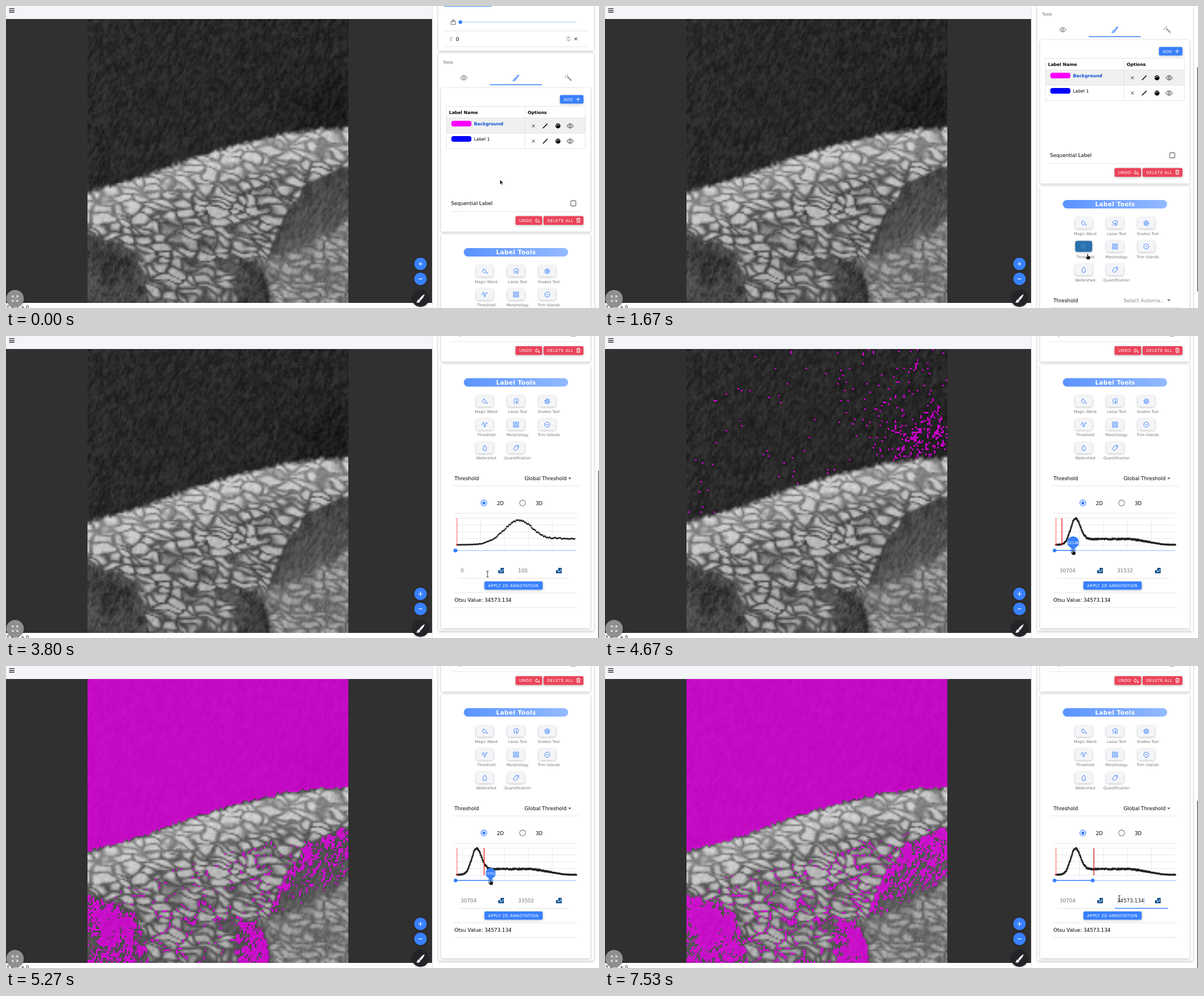
An HTML page with a canvas for the animation above (8 s loop, 1048x534 px).

```html
<!DOCTYPE html>
<html lang="en">
<head>
<meta charset="utf-8">
<title>Threshold annotation</title>
<style>
html, body { margin: 0; width: 100%; height: 100%; overflow: hidden; background: #fff; }
#viewer { position: absolute; left: 0; top: 23px; width: 753px; height: 502px; background: #303030; }
canvas { position: absolute; left: 144px; top: 0; width: 460.5px; height: 502px; }
#mask { image-rendering: pixelated; }
svg { position: absolute; left: 0; top: 0; font: 8.8px "DejaVu Sans", Verdana, sans-serif; }
.card { filter: drop-shadow(0 1px 2px #0004); }
.cell { font-size: 7.7px; }
.bold { font-weight: bold; }
.tool { font-size: 6.6px; fill: #737373; text-anchor: middle; }
.btn { font-size: 7px; letter-spacing: .45px; fill: #fff; }
.title { font-size: 10.5px; font-weight: bold; letter-spacing: .45px; fill: #fff; text-anchor: middle; }
</style>
</head>
<body>
<div id="viewer">
  <canvas id="scan" width="154" height="168"></canvas>
  <canvas id="mask" width="154" height="168"></canvas>
</div>
<svg id="ui" width="1048" height="534"></svg>
<script>
const FPS = 15, FRAMES = 120, W = 154, H = 168;
const BLUE = '#3880ff', RED = '#eb445a', INK = '#222', RULE = '#ddd';
const $ = id => document.getElementById(id);
const mix = (a, b, k) => a + (b - a) * k;
const clamp = x => Math.min(1, Math.max(0, x));
const bell = (x, mid, width) => Math.exp(-(((x - mid) / width) ** 2) / 2);
const repeat = (count, draw) => Array.from({ length: count }, (_, i) => draw(i)).join('');
function smooth(a, b, x) {
  const k = clamp((x - a) / (b - a));
  return k * k * (3 - 2 * k);
}

// ---- Scan texture ----
function hash(x, y) {
  let n = Math.imul(x, 374761393) + Math.imul(y, 668265263) | 0;
  n = Math.imul(n ^ n >>> 13, 1274126177);
  n = Math.imul(n ^ n >>> 15, 2246822519);
  return ((n ^ n >>> 16) >>> 0) / 2 ** 32;
}
function noise(x, y) {
  const i = Math.floor(x), j = Math.floor(y), u = smooth(0, 1, x - i), v = smooth(0, 1, y - j);
  return mix(mix(hash(i, j), hash(i + 1, j), u), mix(hash(i, j + 1), hash(i + 1, j + 1), u), v);
}
// Gap between the nearest and second nearest cell centre.
function cellGap(x, y) {
  const i = Math.floor(x), j = Math.floor(y);
  let near = 9, next = 9;
  for (let a = i - 1; a <= i + 1; a++) for (let b = j - 1; b <= j + 1; b++) {
    const d = Math.hypot(a + hash(a, b) - x, b + hash(a + 99, b) - y);
    if (d < near) { next = near; near = d; } else if (d < next) next = d;
  }
  return next - near;
}

// Edges of the regions, as heights over x.
const surface = x => 330 - 114 * Math.sin(Math.PI / 2 * ((x - 144) / 460) ** 1.15);
const bandTop = x => 290 + 122 * ((604.5 - x) / 130) ** 2.5;
const bandEnd = x => 375 + 80 * ((604.5 - x) / 164) ** .6;
const leftEdge = x => 398 + .4 * (x - 144) + 90 * ((x - 144) / 110) ** 8;

function gray(x, y) {
  const grain = noise((x + .4 * y) / 3.5, (y - .4 * x) / 9) + .5 * hash(x | 0, y | 0) - .75;
  const air = 42 - 4 * (x - 144) / 460 - 12 * bell(x, 572, 45) * bell(y, 175, 34) + 27 * grain;
  const depth = y - surface(x) + 7 * (noise(x / 5, y / 5) - .5);

  const wx = x + 26 * noise(x / 26, y / 18), wy = y + 15 * noise(x / 22 + 40, y / 16);
  const patch = noise(x / 30 + 9, y / 24);
  const cell = smooth(-.05, .3 + .5 * patch, cellGap((wx + .35 * wy) / 33, (wy - .3 * wx) / 14));
  const vein = 126 - 58 * smooth(15, 95, depth) + 30 * (patch - .5);
  let v = mix(vein, 208 - 34 * clamp(depth / 150), cell) + 26 * grain;

  const wobble = y + 14 * (noise(x / 16, y / 14) - .5);
  const below = smooth(-8, 8, wobble - bandEnd(x));
  const across = clamp((y - bandTop(x)) / (bandEnd(x) - bandTop(x)));
  const hollow = 64 + 40 * grain + 24 * (patch - .5);
  v = mix(v, 100 + 62 * cell + 34 * grain, below * smooth(444, 462, x));
  v = mix(v, 66 + 24 * across + 36 * grain, smooth(-7, 5, wobble - bandTop(x)) * (1 - below));
  v = mix(v, hollow, smooth(-8, 8, wobble - leftEdge(x)));
  const half = 13 + 17 * smooth(440, 490, y), off = Math.abs(x - 427 - .13 * (y - 440));
  v = mix(v, hollow, smooth(5, -5, off - half) * smooth(438, 458, wobble));
  return mix(air, v, smooth(-6, 6, depth));
}

const values = Array.from({ length: W * H }, (_, i) => gray(144 + (i % W + .5) * 460.5 / W, 23 + (Math.floor(i / W) + .5) * 502 / H));
function paint(id, pixel) {
  const ctx = $(id).getContext('2d'), img = ctx.createImageData(W, H);
  values.forEach((v, i) => img.data.set(pixel(v), i * 4));
  ctx.putImageData(img, 0, 0);
}
paint('scan', v => [v, v, v, 255]);

// ---- Drawing helpers ----
const text = (x, y, s, attr = '') => `<text x="${x}" y="${y}" ${attr}>${s}</text>`;
const box = (x, y, w, h, r, fill, attr = '') =>
  `<rect x="${x}" y="${y}" width="${w}" height="${h}" rx="${r}" fill="${fill}" ${attr}/>`;
const line = (d, color = RULE, w = .8) => `<path d="${d}" fill="none" stroke="${color}" stroke-width="${w}"/>`;
const dot = (x, y, r, fill, attr = '') => `<circle cx="${x}" cy="${y}" r="${r}" fill="${fill}" ${attr}/>`;
const group = (move, content) => `<g transform="${move}">${content}</g>`;
const card = (y, end, x = 769, w = 264) => box(x, y, w, end - y, 2, '#fff', 'class="card"');
const button = (x, y, w, h, fill, label) =>
  box(x, y, w, h, 2, fill, 'class="card"') + text(x + 6.5, y + h / 2 + 2.5, label, 'class="btn"');

const ring = (x, y, r) => `M${x + r} ${y}a${r} ${r} 0 1 1 ${-2 * r} 0a${r} ${r} 0 1 1 ${2 * r} 0z`;
const polar = (r, i, n) => [r * Math.cos(i * 2 * Math.PI / n), r * Math.sin(i * 2 * Math.PI / n)];
const ICONS = {
  eye: 'M-6 0Q0-8 6 0Q0 8-6 0z' + ring(0, 0, 2),
  brush: 'M5-5Q1-3-1.5 1L0 2.5Q4-1 5-5zM-2 1.5Q-4 1.5-4 4L-5 5Q-1 6-.3 3z',
  wand: 'M-1-1L5 5L6 4L0-2zM-4-4l1.5 1.5M-.5-5.5v2M-5.5-.5h2',
  pencil: 'M-4 4L4-4',
  cross: 'M-2.5-2.5l5 5M2.5-2.5l-5 5',
  plus: 'M-3.5 0h7M0-3.5v7',
  minus: 'M-3.5 0h7',
  undo: 'M-1-3.5L-4 0L-1 3V1Q3 1 4 4Q4-2-1-2z',
  trash: 'M-3.5-2.5h7M-1.5-2.5v-1.5h3v1.5M-2.8-2.5l.5 6.5h4.6l.5-6.5M-1-.5v3M1-.5v3',
  stack: 'M-4-1h8v5h-8zM-3-2.5h6M-2-4h4',
  bucket: 'M-1-4l4 4-3.5 3.5-4-4zM-3-4.5l2 1.5' + ring(4, 3, .8),
  lasso: 'M-4 4.5L-2 2Q-6-2-2-4Q4-6 4.5-2L3.5 0M0-1L4 2L1 4.5z',
  snakes: ring(0, 0, 1.2) + repeat(6, i => ring(...polar(3.7, i + .3, 6), 1.1)),
  curve: 'M-5 1Q-3-5-2-4Q-1-4-1 3Q0 6 1 2Q2-4 3.5-4Q5-3 4-1.5',
  grid: repeat(4, i => `M${i % 2 * 5.5 - 4.5} ${(i >> 1) * 5.5 - 4.5}h3.5v3.5h-3.5z`),
  trim: ring(0, 0, 4.5) + 'M-2 0h4',
  drop: 'M0-5Q4 0 3 2A3 3 0 0 1-3 2Q-4 0 0-5z',
  tag: 'M0-4.5h4.5v4.5L-1.5 5L-5 1.5z' + ring(2.3, -2.3, .5),
  expand: repeat(4, i => {
    const a = i % 2 ? 1 : -1, b = i > 1 ? 1 : -1;
    return `M${5 * a} ${2 * b}v${3 * b}h${-3 * a}M${5 * a} ${5 * b}l${-3.5 * a} ${-3.5 * b}`;
  })
};
const icon = (x, y, name, color = INK, w = .9, fill = 'none') =>
  `<path transform="translate(${x} ${y})" d="${ICONS[name]}" fill="${fill}" stroke="${color}" stroke-width="${w}"/>`;
const palette = (x, y) => dot(x, y, 4.4, '#000') + repeat(4, i => {
  const [dx, dy] = polar(2.5, i + 4, 8);
  return dot(x + dx, y + dy, .8, '#fff');
});

// ---- Motion, in frames ----
const scrollAt = n => 85 * smooth(12, 18, n) + 42.5 * smooth(38, 41, n) + 226 * smooth(51, 55, n);
const drag = n => 1 - (1 - clamp((n - 64) / 21)) ** 2;
const knobAt = n => 794 + 68 * drag(n);
const valueAt = n => Math.round(30600.57 + 3159.33 * drag(n));
// The upper field trails the knob and catches up near the end of the drag.
const upperAt = n => Math.max(30704, valueAt(n - Math.max(0, 79 - n) * .29275));
const markAt = n => 796 + 68 * smooth(64, 87, n);

// Arrival frame and place of each pointer move.
const STOPS = [[5, 863, 314], [23, 853, 438], [41, 955, 476], [44, 909, 422], [56, 851, 421], [63, 794, 377],
  [90, 862, 377], [95, 894, 466], [108, 909, 411]];
function pointerAt(n) {
  if (n >= 64 && n < 90) return [knobAt(n), 377];
  return STOPS.reduce(([px, py], [end, x, y]) => {
    const k = smooth(end - 4, end, n);
    return [mix(px, x, k), mix(py, y, k)];
  }, [873, 307]);
}

// ---- Histogram ----
const coarse = x => 43 * bell(x, 907, 27) + 10 * smooth(930, 980, x);
const fine = x => 42 * bell(x, 831, 8.5) + 10 * smooth(815, 850, x) * (1 - smooth(920, 1000, x));
function histogram(height, step, size) {
  const count = Math.floor(212 / step);
  const d = repeat(count, i => {
    const x = 797 + i * step, h = height(x), jitter = (hash(i, 7) - .5) * Math.min(2.4, .6 + h / 5);
    return `${i ? 'L' : 'M'}${x} ${369 - h + jitter}`;
  });
  return line(d, INK, 1) + `<path d="${d.replace(/[LM]([^LM]+)/g, 'M$1h0')}" stroke="${INK}" stroke-width="${size}" stroke-linecap="round"/>`;
}
const coarsePlot = histogram(coarse, 2.1, 3), finePlot = histogram(fine, .85, 3.4);

// ---- Panel sections ----
const labelRow = (y, color, name, attr) =>
  box(787, y - 9, 35.5, 10, 4, color) + text(827, y - .8, name, `class="cell" ${attr}`) +
  icon(932, y, 'cross') + icon(953, y, 'pencil', '#000', 1.6) + palette(975.5, y) + icon(997, y, 'eye');

const sliceSection =
  card(-20, 79, 764, 275) + box(774, -1, 84, 2, 0, BLUE) + icon(790.5, 28.5, 'stack', '#666') +
  line('M803 28.5H1008', '#8fb6ff') + dot(803, 28.5, 3.2, BLUE) + line('M774 44H1028M774 72H1028') +
  text(784, 61, 'Z', 'class="cell" fill="#888"') + text(795, 61.5, '0') +
  box(989.5, 53, 9, 10, 2, '#eee') + line('M992 57l2-2 2 2M992 59.5l2 2 2-2', '#666') + icon(1007, 58, 'cross', INK, 1);

const labelSection =
  text(772.5, 101.5, 'Tools', 'font-size="7.15" fill="#666"') +
  icon(809, 127, 'eye', '#555') + icon(901, 127, 'brush', BLUE, 1.1) + icon(993, 127, 'wand', '#444') +
  box(855, 138.5, 92, 1.5, 0, BLUE) + card(145, 399) +
  button(979, 157.5, 41.5, 15, BLUE, 'ADD') + icon(1011, 165, 'plus', '#fff') +
  box(778.5, 198, 245.5, 27, 0, '#f0f0f0') + line('M778.5 177.5H1024V252H778.5zM778.5 198H1024M778.5 225H1024M917 177.5V252') +
  text(783, 190.5, 'Label Name', 'class="cell bold"') + text(922, 190.5, 'Options', 'class="cell bold"') +
  labelRow(212, '#f0f', 'Background', 'font-weight="bold" fill="#0a4fdc"') + labelRow(239, '#00f', 'Label 1', '') +
  text(786.5, 352, 'Sequential Label') + box(998, 344.5, 9, 9, 1, '#fff', 'stroke="#444"') + line('M786 363.5H1016') +
  button(900.5, 371.5, 47, 15.5, RED, 'UNDO') + icon(938.5, 379.5, 'undo', '#fff') +
  button(950, 371.5, 70.5, 15.5, RED, 'DELETE ALL') + icon(1011.5, 379, 'trash', '#fff');

const TOOLS = { 'Magic Wand': 'bucket', 'Lasso Tool': 'lasso', 'Snakes Tool': 'snakes', Threshold: 'curve',
  Morphology: 'grid', 'Trim Islands': 'trim', Watershed: 'drop', Quantification: 'tag' };
const toolGrid = pressed =>
  box(809, 428, 184.5, 15, 7.5, 'url(#pill)') + text(901.5, 439.3, 'Label Tools', 'class="title"') +
  Object.entries(TOOLS).map(([name, glyph], i) => {
    const x = 846 + i % 3 * 55.3, y = 469 + Math.floor(i / 3) * 41.2, on = pressed && glyph === 'curve';
    return box(x - 15, y - 10, 30, 19.5, 4, on ? '#2a6fac' : '#f4f5f8', 'class="card"') +
      icon(x, y, glyph, on ? '#4d96dd' : BLUE, 1) + text(x + 2.7, y + 20.5, name, 'class="tool"');
  }).join('');

function methodRow(n) {
  const open = n >= 41 && n < 51, chosen = n >= 47;
  return (open ? box(787, 591.5, 228, 27, 0, '#efefef') : '') +
    line('M787.5 618.5H1014.5', open ? BLUE : RULE, open ? 1.3 : .8) + text(792.5, 608.5, 'Threshold') +
    text(916.5, 608.5, chosen ? 'Global Threshold' : 'Select Automa...', chosen ? '' : 'fill="#8a8a8a"') +
    '<path d="M993.5 604h5.6l-2.8 3z" fill="#555"/>';
}

const radio = (x, on) => dot(x, 295.3, 5.2, '#fff', `stroke="${on ? BLUE : '#777'}" stroke-width="1.1"`) + (on ? dot(x, 295.3, 2.8, BLUE) : '');
const enterKey = x => `<path d="M${x + 5} 410v9.5h-10v-5.5h4v-4z" fill="#0b4f8f"/>` +
  line(`M${x + 3} 412v4h-5M${x - .5} 414.5l-1.5 1.5 1.5 1.5`, '#fff', .9);
const chartGrid = line(repeat(5, i => `M794 ${322 + i * 12}H1008`) + repeat(4, i => `M${838.5 + i * 42.3} 322V374`), '#e2e2e2');
const pin = (x, n) => group(`translate(${x} 378) scale(${smooth(64, 67, n) * (1 - smooth(77, 86, n))})`,
  `<path d="M0 0L-8.5-7A10.5 10.5 0 1 1 8.5-7z" fill="${BLUE}"/>` +
  text(0, -10, valueAt(n), 'font-size="6.6" fill="#fff" text-anchor="middle"'));

function thresholdForm(n) {
  const active = n >= 65, knob = knobAt(n), focus = n >= 107, pasted = n >= 112, picked = n >= 98 && !focus;
  const upper = pasted ? '34573.134' : active ? upperAt(n) : '100';
  return radio(844.5, true) + text(867.5, 298.5, '2D') + radio(913, false) + text(936, 298.5, '3D') +
    line('M792 313.5H1010') + chartGrid + (active ? finePlot : coarsePlot) +
    line('M797 322V370', '#f55', 1) + dot(797, 369, 1.4, '#c33') +
    (active ? line(`M${markAt(n)} 322V370`, n >= 87 ? '#c81e1e' : '#f22', 1.4) : '') +
    line('M794 379.3H1008', '#6fa2ff') + line(`M794 379.3H${knob}`, BLUE, 1.6) + dot(794.5, 379.3, 3.3, BLUE) +
    (active && n < 86 ? dot(knob, 379.3, 5.5, BLUE + '55') : '') + dot(knob, 379.3, 3.3, BLUE) + pin(knob, n) +
    text(803.5, 418, active ? '30704' : '0', 'fill="#777"') + line('M799 428.5H893') + enterKey(875) +
    (focus && !pasted ? box(904.5, 409, 29, 11, 0, '#b4d5fe') : '') +
    text(905, 418, upper, `fill="${focus ? INK : '#777'}"`) + enterKey(977) +
    line('M901 428.5H995', focus ? BLUE : RULE, focus ? 1.3 : .8) + (pasted ? line('M953.3 410V419.5', '#79a8ee') : '') +
    button(845.5, 434, 103, 14.5, BLUE, 'APPLY 2D ANNOTATION') + line('M792 454H1010M792 480H1010') +
    (picked ? box(846, 461, 47.5, 11.5, 0, '#3584e4') : '') +
    text(792.5, 470, `Otsu Value: <tspan fill="${picked ? '#fff' : '#000'}">34573.134</tspan>`);
}

const menu = box(885.5, 405, 137, 61, 2, '#fff', 'class="card"') + box(885.5, 409, 137, 26, 0, '#f3f3f3') +
  text(894.5, 425.5, 'Global Threshold') + text(894.5, 452, 'Local Threshold');

const roundButton = (y, name) => dot(732.5, y, 11, BLUE, 'class="card"') + icon(732.5, y, name, '#fff', 1.2);
const frame = '<defs><linearGradient id="pill"><stop stop-color="#5a93ff"/><stop offset="1" stop-color="#93baff"/></linearGradient></defs>' +
  box(0, 0, 753, 23, 0, '#f4f5f8') + line(repeat(3, i => `M5.5 ${4.5 + i * 3.2}h9.5`), '#000', 1.2) +
  line('M753.5 0V534', '#e0e0e0') + text(1, 535, "Y + '-' + 0", 'class="cell"') +
  roundButton(456, 'plus') + roundButton(482.5, 'minus') + dot(732.5, 517, 15, '#222428', 'class="card"') +
  group('translate(732.5 517) scale(1.4)', icon(0, 0, 'brush', '#fff', .4, '#fff')) +
  dot(16, 517.5, 15.5, '#8e8f91', 'class="card"') + icon(16, 517.5, 'expand', '#fff', 1);

const ARROW = '<path d="M0 0V8.5L2 6.8L3.4 9.8L4.7 9.2L3.4 6.3H6z" stroke="#fff" stroke-width=".7"/>';
const HAND = '<path d="M-1 .5q1-1.3 2 0v3.3l3.5 1v3l-1 2.5h-4.5q-2-2-3-4.5l1-.8 2 1.5z" stroke="#fff" stroke-width=".7"/>';
const BEAM = line('M-2-5h4M0-5v10M-2 5h4', INK, .9);
const pointerShape = n => n < 18 ? ARROW : n < 53 || n >= 60 && n < 91 ? HAND : BEAM;

function scrollbar(n, scroll) {
  const [top, length] = n < 24 ? [46 + .73 * scroll, 426] : n < 47 ? [108 + .75 * (scroll - 85), 397] : [238 + .56 * (scroll - 353.5), 296];
  const shown = smooth(1, 7, n) - smooth(64, 67, n) + smooth(85, 89, n);
  return box(1046.5, top, 1.5, length, .7, '#666', `opacity="${shown}"`);
}

function view(n) {
  const scroll = scrollAt(n), end = n < 24 ? 602 : n < 47 ? 644.5 : 870.5;
  const panel = sliceSection + card(84, end + 4.5, 764, 275) + labelSection + card(404, end) + toolGrid(n >= 24 && n < 40) +
    (n >= 24 ? methodRow(n) : '') + (n >= 47 ? group('translate(0 353.5)', thresholdForm(n)) : '');
  return frame + group(`translate(0 ${-scroll})`, panel) + (n >= 42 && n < 49 ? menu : '') +
    scrollbar(n, scroll) + group(`translate(${pointerAt(n)})`, pointerShape(n));
}

let shownFrame, shownLimit;
function tick() {
  const n = Math.floor((performance.now() + 4) * FPS / 1000) % FRAMES;
  if (n !== shownFrame) {
    shownFrame = n;
    $('ui').innerHTML = view(n);
    const limit = n < 65 ? 0 : 25 + (upperAt(n) - 31532) / 42;
    if (limit !== shownLimit) paint('mask', v => v < limit ? [255, 0, 255, 185] : [0, 0, 0, 0]);
    shownLimit = limit;
  }
  requestAnimationFrame(tick);
}
tick();
</script>
</body>
</html>
```
